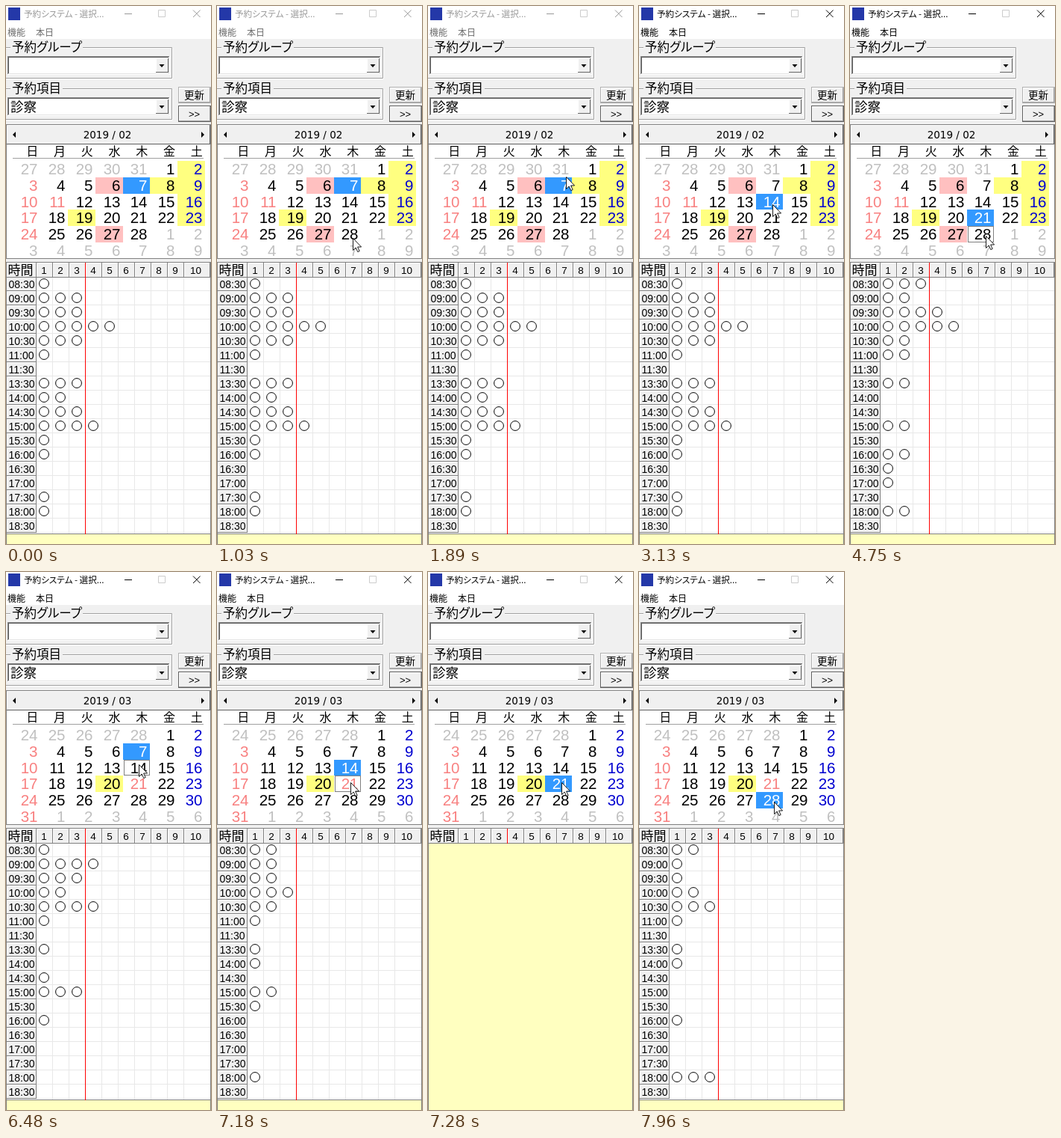
Write an HTML page that moves like this. It is 275x719 px and loops after 8 s.

```html
<!DOCTYPE html>
<html lang="ja">
<head>
<meta charset="utf-8">
<style>
  html, body { margin: 0; width: 100%; height: 100%; overflow: hidden; background: #f0f0f0; }
  svg { display: block; width: 275px; height: 719px; }
  rect { shape-rendering: crispEdges; }
  text { white-space: pre; }
  .jp { font-family: "Noto Sans CJK JP", "Noto Sans CJK", sans-serif; font-weight: 300; font-feature-settings: "palt"; }
  .num { font-family: "Liberation Sans", sans-serif; }
  .wide { font-family: "DejaVu Sans", sans-serif; }
</style>
</head>
<body>
<svg viewBox="0 0 275 719">
  <g id="scene"></g>
  <path id="cursor" d="M.5 .5V16.5L4.2 13L6.8 18.6L9.2 17.5L6.6 12H11.6Z" fill="#fff" stroke="#000" stroke-width=".9"/>
</svg>
<script>
const LOOP = 8000;
const FACE = '#f0f0f0', EDGE = '#808080', PALE = '#ffffc0';
const GRID_TOP = 343, ROW = 19;
const TIMES = ['08:30', '09:00', '09:30', '10:00', '10:30', '11:00', '11:30', '13:30', '14:00',
  '14:30', '15:00', '15:30', '16:00', '16:30', '17:00', '17:30', '18:00', '18:30'];

const MONTHS = {
  2: { days: 28, before: 31, yellow: [2, 8, 9, 16, 19, 23], pink: [6, 27], holidays: [11] },
  3: { days: 31, before: 28, yellow: [20], pink: [], holidays: [21] }
};

// One digit per time slot: number of bookings.
const FEB7 = '133531032341100110';
const events = [
  [0, { month: 2, selected: 7, focus: 0, active: false, slots: FEB7 }],
  [180, { slots: '133531032331100110' }],
  [280, { slots: FEB7 }],
  [2820, { active: true, focus: 14 }],
  [2900, { selected: 14 }],
  [3230, { slots: '223421021231110010' }],
  [3910, { focus: 21 }],
  [4060, { selected: 21 }],
  [4140, { slots: '324522020020211020' }],
  [4750, { focus: 28 }],
  [4830, { selected: 28 }],
  [4910, { slots: '123431021020100010' }],
  [5380, { month: 3, selected: 7, focus: 7 }],
  [5460, { slots: '143241010130100000' }],
  [6480, { focus: 14 }],
  [6560, { selected: 14 }],
  [6720, { slots: '222321011021000010' }],
  [7120, { focus: 21 }],
  [7200, { selected: 21 }],
  [7280, { slots: '' }],
  [7660, { focus: 28 }],
  [7740, { selected: 28 }],
  [7890, { slots: '211231011000100030' }]
];

// Pointer moves: start, end, step count, then [step, x, y] waypoints.
const moves = [
  [580, 1190, 9, [0, 233, 674], [2, 222, 550], [5, 190, 335], [8, 166, 259]],
  [1510, 2290, 11, [0, 160, 257], [1, 158, 250], [5, 194, 220], [7, 199, 228], [10, 184, 249]],
  [2440, 2670, 4, [0, 184, 254], [3, 182, 265]],
  [2820, 3600, 11, [0, 182, 265], [4, 179, 265], [6, 179, 266], [10, 177, 280]],
  [3680, 3760, 2, [0, 180, 280], [1, 183, 280]],
  [4060, 4830, 11, [0, 183, 280], [3, 187, 287], [8, 182, 307]],
  [4910, 5230, 5, [0, 184, 311], [2, 186, 320], [4, 181, 328]],
  [5380, 5990, 9, [1, 181, 328], [8, 177, 250]],
  [6240, 6310, 2, [0, 177, 254], [1, 178, 257]],
  [6480, 7280, 11, [3, 178, 257], [8, 179, 281]],
  [7350, 7960, 9, [0, 179, 283], [4, 181, 307]]
];

const rect = (x, y, w, h, fill) => `<rect x="${x}" y="${y}" width="${w}" height="${h}" fill="${fill}"/>`;
const text = (x, y, size, str, { cls = 'jp', fill = '#000', anchor = 'start' } = {}) =>
  `<text x="${x}" y="${y}" font-size="${size}" class="${cls}" fill="${fill}" text-anchor="${anchor}">${str}</text>`;
const shape = (d, fill, stroke = 'none') => `<path d="${d}" fill="${fill}" stroke="${stroke}"/>`;

// Box with light top/left and dark bottom/right edges, or the reverse.
function bevel(x, y, w, h, fill = FACE, light = '#fff', dark = EDGE) {
  return rect(x, y, w, h, dark) + rect(x, y, w - 1, h - 1, light) + rect(x + 1, y + 1, w - 2, h - 2, fill);
}

function titleBar(active) {
  const ink = active ? '#000' : '#999';
  const menuInk = active ? '#000' : '#6d6d6d';
  return rect(0, 0, 275, 44, '#fff') + rect(3, 2, 16, 17, '#2438a8') +
    text(24, 14.5, 11.6, '予約システム - 選択...', { fill: ink }) +
    rect(159, 10, 10, 1, ink) +
    shape('M204.5 5.5h9v9h-9z', 'none', '#ccc') +
    shape('M251 5.5l9.5 9.5M260.5 5.5l-9.5 9.5', 'none', ink) +
    text(2, 39.5, 12, '機能', { fill: menuInk }) + text(40, 39.5, 12, '本日', { fill: menuInk });
}

function group(y, label, labelWidth, value) {
  return shape(`M0 ${y + 1.5}H223.5V${y + 42.5}H0`, 'none', '#fff') +
    shape(`M0 ${y + .5}H222.5V${y + 41.5}H0`, 'none', '#a0a0a0') +
    rect(6, y - 8, labelWidth + 4, 18, FACE) + text(8, y + 5.5, 16.5, label) +
    bevel(2, y + 12, 218, 25, '#fff', EDGE, '#fff') + bevel(3, y + 13, 216, 23, '#fff', '#606060', '#e3e3e3') +
    bevel(201, y + 15, 17, 19, FACE, '#fff', '#606060') +
    shape(`M205.5 ${y + 23}h7l-3.5 4z`, '#000') +
    text(6, y + 31, 17.5, value);
}

function button(y, outline, label) {
  return rect(231, y, 44, 22, outline) + bevel(232, y + 1, 42, 20, FACE, '#fff', '#a0a0a0') + label;
}

function controls() {
  return rect(0, 44, 275, 675, FACE) +
    group(55, '予約グループ', 93, '') + group(110, '予約項目', 66, '診察') +
    button(108, '#b0b0b0', text(252.5, 124, 13.5, '更新', { anchor: 'middle' })) +
    button(133, '#606060', text(252.5, 148.5, 13, '&gt;&gt;', { cls: 'num', anchor: 'middle' }));
}

function calendar({ month, selected, focus }) {
  const info = MONTHS[month], cellW = 36.75, cellH = 21.7, firstCol = 5;
  let out = rect(0, 158, 275, 180, EDGE) + rect(1, 159, 273, 178, '#fff') +
    bevel(1, 159, 273, 26, FACE, '#fff', '#606060') +
    text(136, 177, 13.5, `2019 / 0${month}`, { cls: 'wide', anchor: 'middle' }) +
    shape('M13 168v8l-4-4zM262 168v8l4-4z', '#000') + rect(9, 203, 256, 1, '#a0a0a0');
  [...'日月火水木金土'].forEach((name, col) => {
    out += text(9.5 + (col + 1) * cellW - 3, 200, 16, name, { anchor: 'end' });
  });
  for (let i = 0; i < 42; i++) {
    const col = i % 7, n = i - firstCol + 1, inside = n >= 1 && n <= info.days;
    const x = Math.round(9.5 + col * cellW), right = Math.round(9.5 + (col + 1) * cellW);
    const row = Math.floor(i / 7), y = Math.round(207.2 + row * cellH);
    const h = Math.round(207.2 + (row + 1) * cellH) - y;
    const day = n < 1 ? n + info.before : inside ? n : n - info.days;
    let ink = '#c0c0c0', back = '';
    if (inside) {
      ink = col === 0 || info.holidays.includes(n) ? '#f88080' : col === 6 ? '#0000d0' : '#000';
      if (info.yellow.includes(n)) back = '#ffff80';
      if (info.pink.includes(n)) back = '#ffc0c0';
      if (n === selected) { back = '#3399ff'; ink = '#fff'; }
    }
    if (back) out += rect(x, y, right - x, h, back);
    out += text(right - 3.5, y + 18, 20.5, day, { cls: 'num', fill: ink, anchor: 'end' });
    if (inside && n === focus && n !== selected)
      out += `<path d="M${x + 1.5} ${y + .5}H${right - .5}V${y + h - .5}H${x + 1.5}Z" fill="none" stroke="#000" stroke-dasharray="1"/>`;
  }
  return out;
}

function schedule(slots) {
  const colX = c => 40 + c * 22;
  let out = rect(0, 342, 275, 377, EDGE) + rect(1, 343, 273, 376, slots ? '#fff' : PALE);
  if (slots) {
    for (let c = 1; c < 10; c++) out += rect(colX(c), 362, 1, 343, '#e8e8e8');
    TIMES.forEach((time, r) => {
      const y = GRID_TOP + ROW * (r + 1);
      out += rect(41, y + 18, 233, 1, '#e8e8e8') + bevel(1, y, 40, ROW) +
        text(3.5, y + 15, 14, time, { cls: 'num' });
      for (let c = 0; c < +slots[r]; c++)
        out += `<circle cx="${51 + 22 * c}" cy="${y + 9}" r="6.4" fill="none" stroke="#000"/>`;
    });
    out += rect(0, 705, 275, 1, EDGE) + rect(1, 706, 273, 13, PALE);
  }
  out += bevel(1, GRID_TOP, 40, ROW + 1) + text(2.5, 358.5, 17, '時間');
  for (let c = 0; c < 10; c++) {
    const x = colX(c) + 1, w = c === 9 ? 35 : 22;
    out += bevel(x, GRID_TOP, w, ROW + 1) +
      text(x + w / 2 - (c === 9 ? 2 : 1), 358, 13.5, c + 1, { cls: 'num', anchor: 'middle' });
  }
  return out + rect(106, GRID_TOP, 1, slots ? 363 : 20, '#f00');
}

function pointerAt(t) {
  const move = moves.filter(m => t >= m[0]).pop();
  if (!move) return null;
  const [start, end, count, ...points] = move;
  const step = Math.min(count - 1, Math.floor((t - start) / (end - start) * (count - 1) + .1));
  const next = points.findIndex(p => p[0] >= step);
  if (next < 0) return points[points.length - 1].slice(1);
  const b = points[next], a = points[next - 1] || b;
  const f = a === b ? 0 : (step - a[0]) / (b[0] - a[0]);
  return [1, 2].map(k => Math.round(a[k] + (b[k] - a[k]) * f));
}

const scene = document.getElementById('scene');
const cursor = document.getElementById('cursor');
let shown = -1;

function render(t) {
  const passed = events.filter(e => t >= e[0]);
  if (passed.length !== shown) {
    shown = passed.length;
    const state = Object.assign({}, ...passed.map(e => e[1]));
    scene.innerHTML = titleBar(state.active) + controls() + calendar(state) + schedule(state.slots);
  }
  const tip = pointerAt(t);
  cursor.setAttribute('visibility', tip ? 'visible' : 'hidden');
  if (tip) cursor.setAttribute('transform', `translate(${tip})`);
}

const origin = performance.now();
function tick() {
  render((performance.now() - origin) % LOOP);
  requestAnimationFrame(tick);
}
tick();
</script>
</body>
</html>
```
